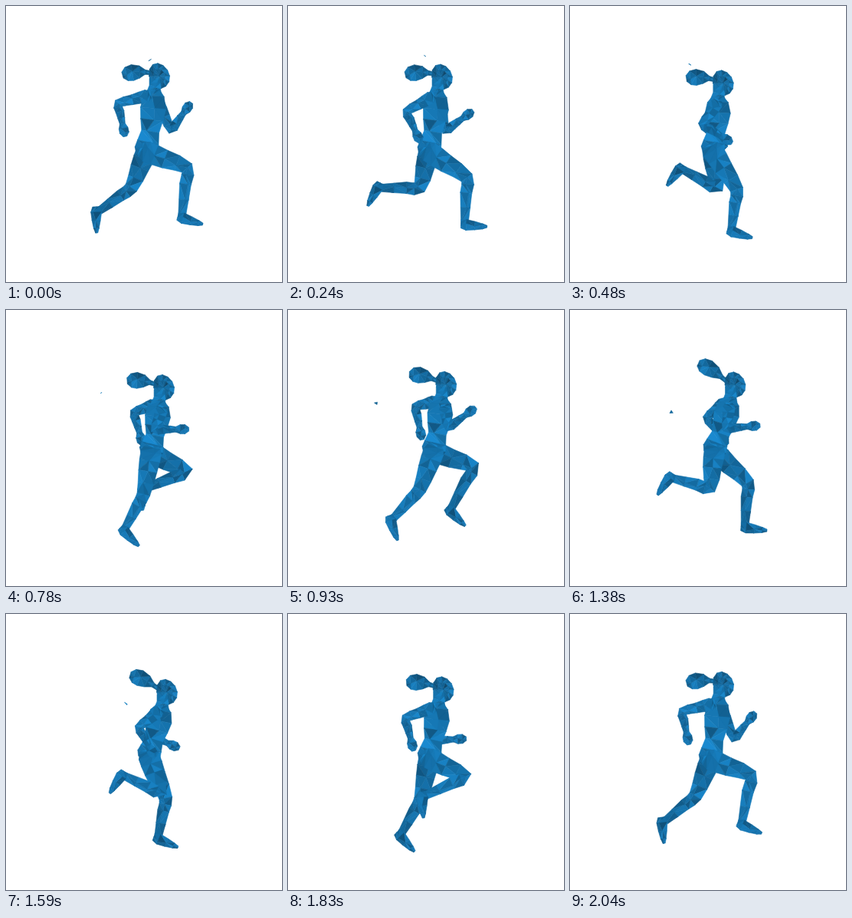
These frames come from a looping animation (360 by 360 pixels, 2.07 s). An HTML page with a canvas:

```html
<!DOCTYPE html>
<html lang="en">
<head>
<meta charset="utf-8">
<title>Low-poly runner</title>
<style>
html, body { margin: 0; width: 100%; height: 100%; overflow: hidden; background: #fff; }
canvas { display: block; width: 360px; height: 360px; }
</style>
</head>
<body>
<canvas id="stage" width="360" height="360"></canvas>
<script>
const LOOP = 2070, STEP = 30, HALF = Math.PI;
const ctx = document.getElementById('stage').getContext('2d');
ctx.lineJoin = 'round';

// Joint angles over one cycle, in degrees: 0 hangs down, 90 points ahead.
// Both sides share them, half a cycle apart.
const gait = {
  thigh: [68, 54, 27, -10, -23, -14, 11, 61],
  shin: [-6, -3, -9, -28, -54, -92, -118, -69],
  foot: [67, 79, 64, 39, -5, -36, -42, -8],
  upperArm: [-75, -58, -28, -19, 26, 10, -45, -68],
  forearm: [12, 26, 62, 90, 144, 122, 35, 15]
};
const headSway = [200, 201, 200, 206, 207, 216, 211, 203];

const { sin, cos, hypot } = Math;
const add = (p, x, y) => [p[0] + x, p[1] + y];
const mix = (p, q, k) => p.map((v, c) => v + (q[c] - v) * k);
const wide = (p, w) => [p[0], p[1], w];
const heading = deg => [sin(deg * HALF / 180), cos(deg * HALF / 180)];
const along = (p, dir, len) => add(p, dir[0] * len, dir[1] * len);

function catmull(a, b, c, d, u) {
  return b + u / 2 * (c - a + u * (2 * a - 5 * b + 4 * c - d + u * (3 * (b - c) + d - a)));
}

// Smooth periodic value of evenly spaced keys at an angle of the cycle.
function cycle(keys, phase) {
  const n = keys.length, pos = phase / (2 * HALF) * n, i = Math.floor(pos);
  const key = j => keys[(i + j + n) % n];
  return catmull(key(-1), key(0), key(1), key(2), pos - i);
}

let seed;
function rand() {
  seed = (Math.imul(seed, 1664525) + 1013904223) >>> 0;
  return seed / 4294967296;
}

function facet(a, b, c, shade = 0) {
  const light = 36 + shade + (rand() + rand() - 1) * 9;
  ctx.beginPath();
  for (const p of [a, b, c]) ctx.lineTo(p[0], p[1]);
  ctx.closePath();
  ctx.fillStyle = ctx.strokeStyle = `hsl(203 78% ${light}%)`;
  ctx.lineWidth = 0.6;
  ctx.fill();
  ctx.stroke();
}

// Faceted strip along a smooth spine of [x, y, width] stations.
function ribbon(stations, cuts = 2, shade = 0) {
  const spine = [], last = stations.length - 1;
  const station = i => stations[Math.min(Math.max(i, 0), last)];
  for (let k = 0; k <= last * cuts; k++) {
    const i = Math.floor(k / cuts), u = k / cuts - i;
    spine.push(station(i).map((v, c) =>
      catmull(station(i - 1)[c], v, station(i + 1)[c], station(i + 2)[c], u)));
  }
  const rows = spine.map((p, i) => {
    const a = spine[Math.max(i - 1, 0)], b = spine[Math.min(i + 1, spine.length - 1)];
    const dx = b[0] - a[0], dy = b[1] - a[1], d = hypot(dx, dy) || 1;
    const side = s => add(p, -dy / d * p[2] * s, dx / d * p[2] * s);
    return [side(-0.5), side((rand() - 0.5) * 0.6), side(0.5)];
  });
  for (let i = 1; i < rows.length; i++) {
    const a = rows[i - 1], b = rows[i];
    for (let s = 0; s < 2; s++) {
      const flip = rand() < 0.5;
      facet(a[s], a[s + 1], flip ? b[s] : b[s + 1], shade);
      facet(flip ? a[s + 1] : a[s], b[s], b[s + 1], shade);
    }
  }
}

function drawHead(c) {
  const n = 12;
  // An egg leaning forward, flattened at the nape.
  const point = (i, k) => {
    const a = i / n * 2 * HALF;
    return add(c, k * (13.5 * cos(a) + 2 * sin(a)), k * (16.5 - 1.5 * cos(a)) * sin(a));
  };
  for (let i = 0; i < n; i++) {
    const shade = i > 5 ? -4 : 1;
    const [p, q, r, s] = [point(i, 1), point(i + 1, 1), point(i, 0.55), point(i + 1, 0.55)];
    facet(p, q, r, shade);
    facet(q, r, s, shade);
    facet(r, s, c, shade);
  }
}

function drawTail(head, phase) {
  const lift = 12 - 8 * cos(phase) - 9 * sin(phase) - 3 * cos(2 * phase) + 3 * sin(2 * phase);
  const band = add(head, -11, -4), tip = add(head, -48, -lift);
  const part = (k, w) => wide(add(mix(band, tip, k), 0, -2.5 * sin(k * HALF)), w);
  ribbon([part(0, 5), part(0.2, 6), part(0.4, 16), part(0.65, 21), part(0.86, 18), part(1, 8)], 1, -2);
}

function drawArm(chest, phase, reach, shade) {
  const upper = heading(cycle(gait.upperArm, phase));
  const fore = heading(cycle(gait.forearm, phase));
  const shoulder = add(chest, -1 - 8 * cos(phase), -11 - 5 * cos(phase));
  const elbow = along(shoulder, upper, reach);
  const wrist = along(elbow, fore, 27);
  ribbon([wide(along(shoulder, upper, -6), 8), wide(shoulder, 16),
    wide(mix(shoulder, elbow, 0.5), 13), wide(elbow, 11),
    wide(mix(elbow, wrist, 0.4), 11), wide(wrist, 7)], 2, shade);
  ribbon([wide(wrist, 7), wide(along(wrist, fore, 6), 12),
    wide(along(wrist, fore, 12), 12), wide(along(wrist, fore, 17), 5)], 1, shade);
}

function drawLeg(hip, phase, shade) {
  const [thigh, shin, foot] = ['thigh', 'shin', 'foot'].map(k => heading(cycle(gait[k], phase)));
  const knee = along(hip, thigh, 54 + 3 * cos(phase) + 5 * sin(phase));
  const ankle = along(knee, shin, 52 + 5 * cos(phase) + 3 * cos(2 * phase));
  const sole = [-foot[1], foot[0]];
  const onFoot = (len, drop, w) => wide(along(along(ankle, foot, len), sole, drop), w);
  ribbon([wide(along(hip, thigh, -9), 16), wide(hip, 27), wide(mix(hip, knee, 0.45), 24),
    wide(knee, 17), wide(mix(knee, ankle, 0.35), 15), wide(ankle, 10), onFoot(1, 5, 9)], 2, shade);
  ribbon([onFoot(-4, 6, 9), onFoot(3, 5, 14), onFoot(14, 4, 11),
    onFoot(24, 3, 7), onFoot(30, 2, 3)], 1, shade);
}

function drawTorso(neck, chest, waist, pelvis) {
  ribbon([wide(neck, 15), wide(mix(neck, chest, 0.35), 27), wide(chest, 33),
    wide(mix(chest, waist, 0.5), 29), wide(waist, 23),
    wide(mix(waist, pelvis, 0.6), 28), wide(pelvis, 31),
    wide(mix(waist, pelvis, 1.35), 24)], 1, 1);
}

// A loose splinter drifting behind the runner.
function drawShard(t, phase) {
  if (t > 1590) return;
  seed = t + 5;
  const c = [151 + 37 * cos(phase), 100 - 30 * cos(phase) - 20 * sin(phase)];
  const near = () => add(c, (rand() - 0.5) * 7, (rand() - 0.5) * 5);
  facet(near(), near(), near());
}

function draw(t) {
  const phase = t / LOOP * 2 * HALF, other = (phase + HALF) % (2 * HALF);
  const sway = cos(phase), swing = sin(phase);
  const head = [cycle(headSway, phase), 97 - 5.2 * cos(2 * phase - 0.6) - 1.5 * sway];
  const hip = [186.8 - 3.5 * sway, 187 + 3 * sway + 1.5 * swing];
  const neck = add(head, -7, 18), pelvis = add(hip, 0, -3);
  const chest = add(mix(neck, pelvis, 0.31), 2, 0);
  const waist = add(mix(neck, pelvis, 0.7), 2, 0);
  const reach = 31 + 7 * sway;

  seed = 77;
  ctx.fillStyle = '#fff';
  ctx.fillRect(0, 0, 360, 360);
  drawArm(chest, other, reach, -1);
  drawLeg(hip, other, -1);
  drawTail(head, phase);
  ribbon([wide(add(head, -5, 4), 16), wide(add(neck, 1, -5), 14), wide(add(neck, 0, 4), 19)], 1);
  drawHead(head);
  drawTorso(neck, chest, waist, pelvis);
  drawLeg(hip, phase, 1);
  drawArm(chest, phase, reach, 1);
  drawShard(t, phase);
}

const start = performance.now();
let shown = -1;
function tick() {
  const t = Math.floor((performance.now() - start) % LOOP / STEP) * STEP;
  if (t !== shown) draw(shown = t);
  requestAnimationFrame(tick);
}
tick();
</script>
</body>
</html>
```
